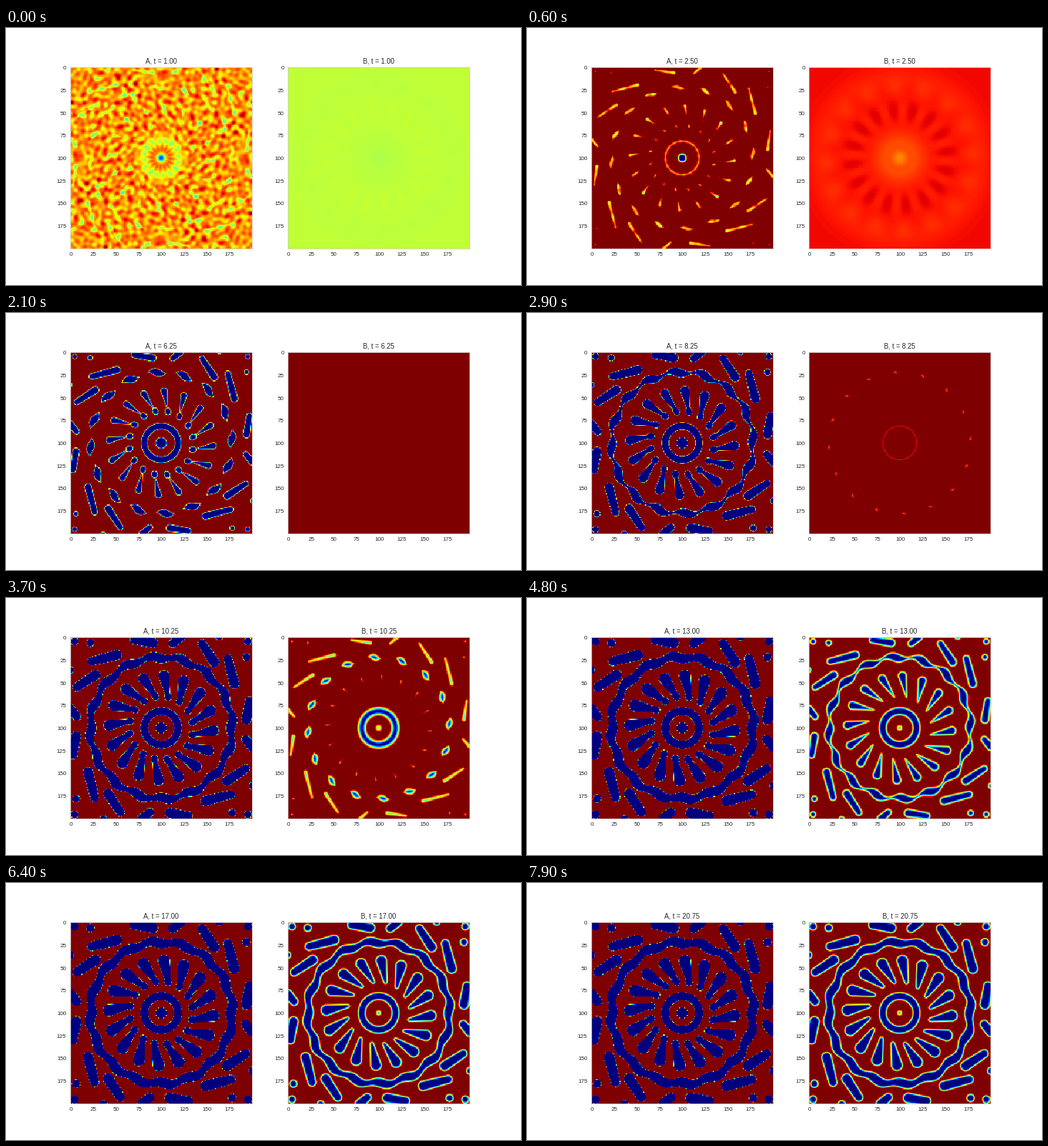
These frames come from a looping animation (720 px wide and 360 px high, 8000 ms). A matplotlib script:

```python
import numpy as np
import matplotlib.pyplot as plt
from matplotlib.animation import FuncAnimation

plt.rcParams.update({
    "font.family": "Liberation Sans",
    "text.color": "0.15",
    "xtick.color": "0.15",
    "ytick.color": "0.15",
    "axes.edgecolor": "0.8",
    "axes.linewidth": 0.8,
})

N = 200          # cells per side
CELL = 1.268     # screen pixels per cell; all lengths below are in pixels
FRAMES, INTERVAL = 80, 100
T0, DT = 1.0, 0.25
ARMS = 16

axis = (np.arange(N) - (N - 1) / 2) * CELL
X, Y = np.meshgrid(axis, axis)
R = np.hypot(X, Y)
PHI = np.arctan2(X, -Y)      # clockwise from the top


def cone(a, ra, b, rb):
    """Distance to a capsule whose radius runs from ra to rb."""
    (ax, ay), (bx, by) = a, b
    dx, dy = bx - ax, by - ay
    h = ((X - ax) * dx + (Y - ay) * dy) / (dx * dx + dy * dy + 1e-9)
    h = np.clip(h, 0, 1)
    return np.hypot(X - ax - h * dx, Y - ay - h * dy) - ra - (rb - ra) * h


def polar(deg, r):
    a = np.radians(deg)
    return r * np.sin(a), -r * np.cos(a)


def spokes(deg_a, r_a, ra, deg_b, r_b, rb):
    """One tapered capsule repeated on every arm."""
    turns = np.arange(ARMS) * 360 / ARMS
    return np.min([cone(polar(deg_a + s, r_a), ra, polar(deg_b + s, r_b), rb)
                   for s in turns], axis=0)


def wave(deg):
    return np.cos(ARMS * (PHI - np.radians(deg)))


def four_fold(z):
    return [np.rot90(z, k) for k in range(4)]


def bump(z, width):
    return np.exp(-(z / width) ** 2)


# Mature shapes as distance fields
PETALS = spokes(3, 73, 8.3, 11.5, 46, 3.6)
TAILS = spokes(12.5, 44, 5, 11.5, 46, 5)
HUB = np.abs(R - 23.5) - 5.5
MIDLINE = 98.8 + 2 * np.cos(ARMS * PHI + np.radians(ARMS * 3.4 + 90))

strokes = [((74, -92), (57, -118)), ((102, -62), (93, -97)),
           ((-12, -119), (-38, -123)), ((26, -127), (16, -118))]
dots = [(119, -99), (81, -128), (121, -121)]
shapes = [cone(a, 7.5, b, 6.3) for a, b in strokes]
shapes += [np.hypot(X - x, Y - y) - 5.8 for x, y in dots]
OUTER = np.min([r for s in shapes for r in four_fold(s)], axis=0)


def pattern(off, hub, petal, tail, outer):
    """Shapes shrunk by the given amounts; the big ring breaks into beads."""
    half = 6.4 - 1.9 * off + (1 + 1.1 * off) * wave(-3.4)
    return np.min([HUB + hub, PETALS + petal, TAILS + tail,
                   np.abs(R - MIDLINE) - half, OUTER + outer], axis=0)


# Grainy start with the same four-fold symmetry
rng = np.random.default_rng(7)
freq = np.hypot(*np.meshgrid(np.fft.fftfreq(N), np.fft.fftfreq(N)))
grain = np.fft.ifft2(np.fft.fft2(rng.normal(size=(N, N))) * bump(freq - 0.09, 0.06)).real
grain = np.sum(four_fold(grain), axis=0)
grain /= grain.std()

fade = np.clip((R - 16) / 22, 0, 1)
lobes = wave(4) * bump(R - 22, 15)
SEEDS = bump(np.clip(pattern(2, 2, 3.1, 0.7, 2) + 4.8, 0, None), 2)
A_START = (0.755 - 0.62 * bump(R, 5) - 0.15 * bump(R - 24, 8) + 0.06 * bump(R - 13, 5)
           + 0.07 * grain * fade + 0.05 * lobes - 0.19 * SEEDS * fade)
A_SPOTS = (1.12 - 0.45 * SEEDS * (1 - 0.15 * grain * fade)
           - 0.13 * bump(R - 23.5, 7) + 0.04 * lobes)
A_SPOTS = np.minimum(A_SPOTS, (R - 3.2) / 4)

B_WAVE = (-0.11 * bump(R, 34) - 0.03 * bump(R, 6) + 0.02 * bump(R - 14, 5)
          - 0.03 * bump(R - 105, 22)
          + 0.02 * wave(15) * bump(R - 66, 14)
          - 0.01 * wave(-3.4) * bump(R - 99, 14))


def field_a(t):
    if t < 2.5:
        return A_START + (A_SPOTS - A_START) * (t - T0) / 1.5
    off = 4.5 * bump(t - 2.5, 5)
    soft = 0.2 + 2.8 * np.exp((2.5 - t) / 2.5)
    d = np.minimum(pattern(off, 0.5 * off, 1.55 * off, 0.5 * off, off), R - 7.6)
    sharp = np.clip(0.5 + d / (2 * soft), 0, 1)
    return A_SPOTS + (sharp - A_SPOTS) * min((t - 2.5) / 2, 1)


def field_b(t):
    if t < 8:
        mean = 0.585 + 0.21 * (t - T0)
        return mean + B_WAVE * min(0.2 + 0.53 * (t - T0), 1)
    off = 4.5 * np.exp((10.25 - t) / 2)
    hub = 1.1 * max(off - 4, 0)
    d = pattern(off, hub, 2 * off, 2 + 2 * off, 1.35 * off) + 0.8
    d = np.minimum(d, 0.7 * (R - 1.8) + hub)
    return 0.5 + d / (3.6 + 0.6 * off)


fig, axes = plt.subplots(1, 2, figsize=(10, 5), dpi=72, facecolor="white")
images, titles = [], []
for ax in axes:
    images.append(ax.imshow(np.zeros((N, N)), cmap="jet", vmin=0, vmax=1,
                            interpolation="nearest"))
    titles.append(ax.set_title("", fontsize=9.6, pad=5))
    ax.set_xticks(range(0, N, 25))
    ax.set_yticks(range(0, N, 25))
    ax.tick_params(length=0, pad=5.6, labelsize=8)


def update(i):
    t = T0 + DT * i
    for image, title, name, field in zip(images, titles, "AB", (field_a, field_b)):
        image.set_data(np.clip(field(t), 0, 1))
        title.set_text(f"{name}, t = {t:.2f}")
    return images + titles


anim = FuncAnimation(fig, update, frames=FRAMES, interval=INTERVAL,
                     repeat=True, repeat_delay=0, blit=False)
plt.show()
```
